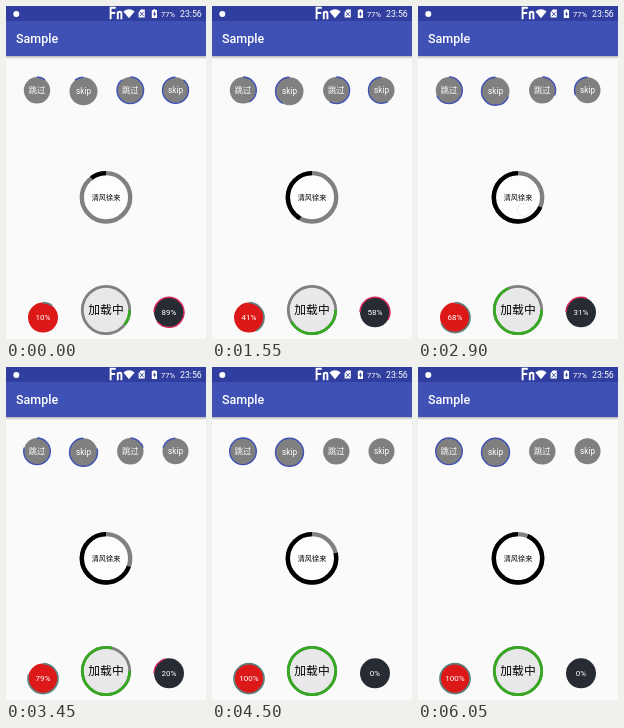
Write an HTML page that moves like this. It is 200 px wide and 333 px high and loops after 6.1 s.

```html
<!DOCTYPE html>
<html lang="zh">
<head>
<meta charset="utf-8">
<title>Sample</title>
<style>
  html, body { margin: 0; width: 100%; height: 100%; overflow: hidden; background: #fafafa; }
  svg { display: block; width: 100%; height: 100%; }
  text { font-family: Roboto, "Noto Sans CJK SC", "Noto Sans CJK", sans-serif; fill: #fff; }
  .mid { text-anchor: middle; }
</style>
</head>
<body>
<svg id="stage" viewBox="0 0 200 333">
  <defs>
    <linearGradient id="shade" x1="0" y1="0" x2="0" y2="1">
      <stop offset="0" stop-color="#000" stop-opacity=".28"/>
      <stop offset="1" stop-color="#000" stop-opacity="0"/>
    </linearGradient>
  </defs>
  <rect width="200" height="333" fill="#fafafa"/>
  <rect y="50" width="200" height="3" fill="url(#shade)"/>
  <rect width="200" height="50" fill="#3f51b5"/>
  <rect width="200" height="15" fill="#303f9f"/>

  <!-- status bar -->
  <circle cx="10.3" cy="8" r="3" fill="#fff"/>
  <path d="M104.6 13.2V1.8H109.8M104.6 7H109.2M111.8 13.2V5.4M111.8 7.2Q112.4 5.8 113.8 5.8Q115.4 5.8 115.4 7.8V13.2"
        fill="none" stroke="#fff" stroke-width="1.9"/>
  <path d="M117.4 5.4Q123 1.2 128.6 5.4L123 12.2Z" fill="#fff"/>
  <path d="M135 3.6H138.8V11.6H132.6V6Z" fill="#fff"/>
  <path d="M133.8 5.8L137.8 10.2M137.8 5.8L133.8 10.2" stroke="#303f9f" stroke-width=".9"/>
  <path d="M147.3 3.2H149.5V4H151V12H145.8V4H147.3Z" fill="#fff"/>
  <path d="M148.9 5L147 8.5H148.2V11L150 7.5H148.9Z" fill="#303f9f"/>
  <text x="155" y="10.6" font-size="7.5">77%</text>
  <text x="174" y="11.2" font-size="8.75">23:56</text>
  <text x="10" y="37" font-size="12.5" font-weight="500">Sample</text>
</svg>
<script>
const stage = document.getElementById('stage');
const LOOP = 6100, STEP = 50;

function add(tag, attrs, parent = stage) {
  const el = document.createElementNS('http://www.w3.org/2000/svg', tag);
  for (const key in attrs) el.setAttribute(key, attrs[key]);
  return parent.appendChild(el);
}

// Each dial: disc, optional track, progress arc starting at angle `from`, caption.
function dial(o) {
  const g = add('g', { transform: `translate(${o.x} ${o.y})` });
  add('circle', { r: o.disc, fill: o.fill }, g);
  const ring = { r: o.r, fill: 'none', 'stroke-width': o.w };
  if (o.track) add('circle', { ...ring, stroke: o.track }, g);
  const arc = add('circle', {
    ...ring, stroke: o.line, pathLength: 100,
    transform: `rotate(${o.from ?? -90}) scale(1 ${o.ccw ? -1 : 1})`
  }, g);
  const label = add('text', {
    class: 'mid', y: o.base, 'font-size': o.size,
    'font-weight': o.weight || 400, style: `fill:${o.ink || '#fff'}`
  }, g);
  label.textContent = o.text || '';
  return { ...o, arc, label };
}

const skip = { disc: 13.2, r: 13.3, w: 1.4, fill: '#808080', line: '#3f51b5', size: 8.2, base: 2.9 };
const dials = [
  dial({ ...skip, x: 31, y: 84.3, text: '跳过', value: 'up' }),
  dial({ ...skip, x: 77.5, y: 85.3, disc: 14, r: 14, text: 'skip', ccw: true, value: 'up' }),
  dial({ ...skip, x: 124.3, y: 84.3, text: '跳过', value: 'down' }),
  dial({ ...skip, x: 169.5, y: 84.2, disc: 13, r: 13, text: 'skip', ccw: true, value: 'down' }),
  dial({ x: 100, y: 191.3, disc: 24, r: 24.2, w: 4.4, fill: '#fdfdfd', track: '#808080', line: '#000',
    ccw: true, size: 7.2, base: 2.7, weight: 500, ink: '#000', text: '清风徐来', value: 'tapped' }),
  dial({ x: 37, y: 311.6, disc: 15, r: 15, w: 1.7, fill: '#dd1818', line: '#5d8480',
    size: 8, base: 2.8, percent: true, value: 'up' }),
  dial({ x: 100, y: 304, disc: 24, r: 23.7, w: 2.8, fill: '#e8e8e8', track: '#808080', line: '#35a91f',
    from: 0, size: 11.8, base: 4.2, weight: 500, ink: '#000', text: '加载中', value: 'up' }),
  dial({ x: 163, y: 306.3, disc: 15, r: 15, w: 1.5, fill: '#272b33', line: '#d42a5c',
    from: 180, size: 8, base: 2.8, percent: true, value: 'down' })
];

// Finger marks on the centre dial: each tap toggles its countdown.
const taps = [
  { from: 2800, to: 2950, x: 106, y: 204 },
  { from: 3950, to: 4050, x: 92, y: 192 },
  { from: 5050, to: 5250, x: 99, y: 196 }
];
const finger = add('circle', { r: 6.5, fill: '#fff', 'fill-opacity': .4, stroke: '#bbb', 'stroke-width': .5, 'stroke-opacity': .6 });

const clamp = (v, lo, hi) => Math.min(hi, Math.max(lo, v));

function progress(t) {
  const p = t < 700 ? 10.4 + t * 14.6 / 700 : 25 + (t - 700) * 0.0198;
  return Math.min(100, p);
}

function draw(now) {
  const t = Math.floor((now % LOOP) / STEP) * STEP;
  const up = progress(t);
  const values = {
    up,
    down: 100 - up,
    tapped: progress(Math.min(t, 2950)) + clamp(t - 4050, 0, 1200) * 0.02
  };
  for (const d of dials) {
    const v = values[d.value];
    d.arc.setAttribute('stroke-dasharray', `${v} 200`);
    d.arc.setAttribute('visibility', v > 0 ? 'visible' : 'hidden');
    if (d.percent) d.label.textContent = Math.floor(v) + '%';
  }
  const tap = taps.find(p => t >= p.from && t < p.to);
  finger.setAttribute('visibility', tap ? 'visible' : 'hidden');
  if (tap) {
    finger.setAttribute('cx', tap.x);
    finger.setAttribute('cy', tap.y);
  }
}

const start = performance.now();
function tick() {
  draw(performance.now() - start);
  requestAnimationFrame(tick);
}
tick();
</script>
</body>
</html>
```
